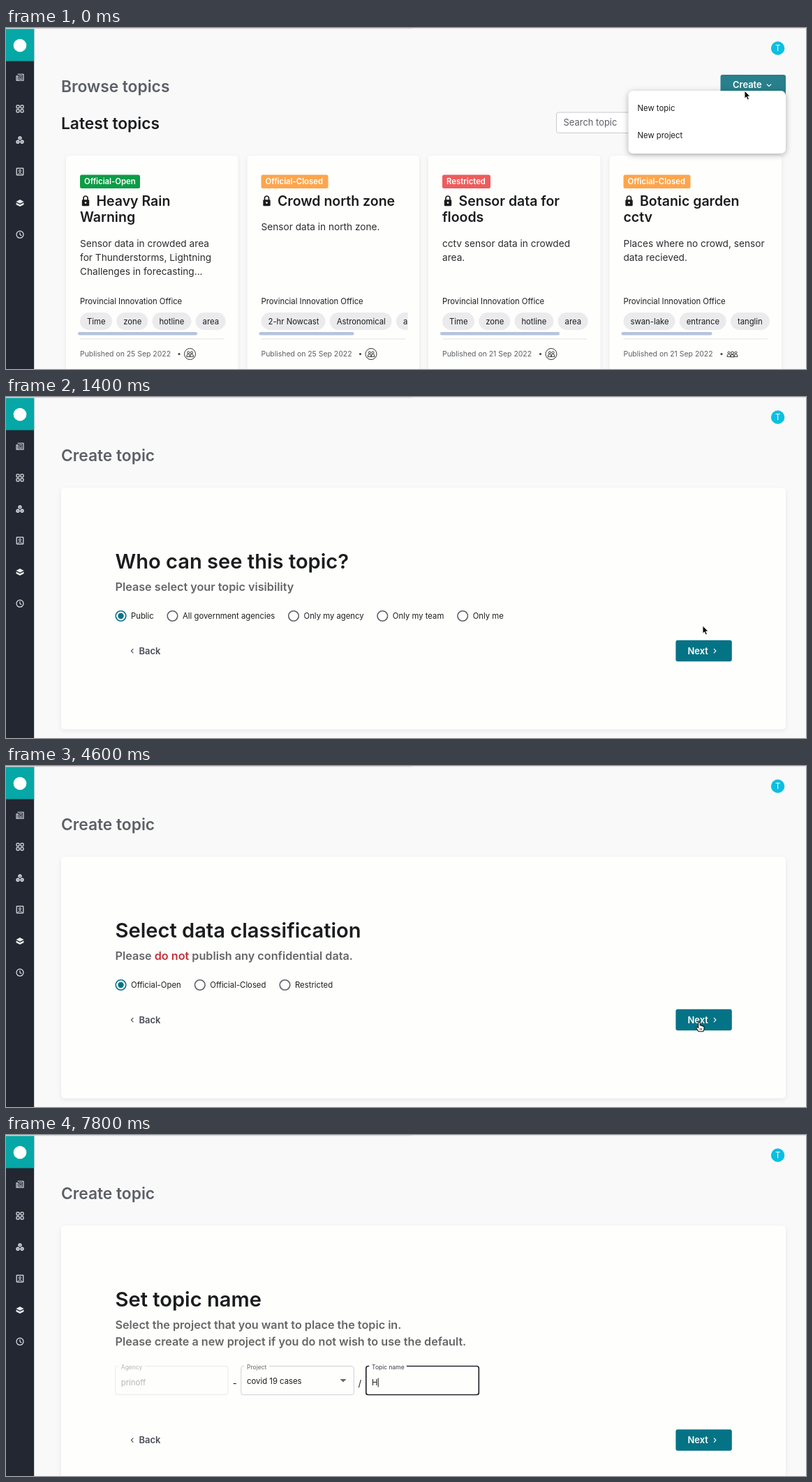
Write an HTML page that moves like this. It is 1146 by 489 pixels and loops after 8000 ms.

```html
<!DOCTYPE html>
<html lang="en">
<head>
<meta charset="utf-8">
<title>Create topic</title>
<style>
  html, body { margin: 0; width: 100%; height: 100%; overflow: hidden; background: #f9f9fa; }
  svg { display: block; font-family: Inter, sans-serif; font-optical-sizing: none; }
  text { white-space: pre; }
  .card { fill: #fefefd; filter: drop-shadow(0 2px 3px rgba(0,0,0,.07)); }
  .menu { fill: #fff; filter: drop-shadow(0 2px 4px rgba(0,0,0,.3)); }
  .line { fill: none; stroke-linecap: round; stroke-linejoin: round; }
</style>
</head>
<body>
<svg id="stage" width="1146" height="489" viewBox="0 0 1146 489"></svg>
<script>
const STEP = 200, LOOP = 8000;
const TEAL = '#057386', INK = '#1b1c1e', GREY = '#5c5f66';
const SMALL = 11.32, MEDIUM = 12.95, SUBHEAD = 16.2, TITLE = 22.75, HERO = 29.1;

const text = (x, y, s, size = SMALL, fill = INK, weight = 400, extra = '') =>
  `<text x="${x}" y="${y}" font-size="${size}" fill="${fill}" font-weight="${weight}" ${extra}>${s}</text>`;
const rect = (x, y, w, h, fill, r = 0, extra = '') =>
  `<rect x="${x}" y="${y}" width="${w}" height="${h}" rx="${r}" fill="${fill}" ${extra}/>`;
const circle = (x, y, r, fill, extra = '') =>
  `<circle cx="${x}" cy="${y}" r="${r}" fill="${fill}" ${extra}/>`;
const line = (d, stroke, width = 1.2) =>
  `<path class="line" d="${d}" stroke="${stroke}" stroke-width="${width}"/>`;
const at = (x, y, body) => `<g transform="translate(${x} ${y})">${body}</g>`;
const heading = (y, s, size, fill = INK) => text(156.5, y, s, size, fill, 600);

// Sidebar and header

const sidebarIcons = [
  line('M-3-4.5H5V4.5H-5V-2H-3V4M-1-2H3M-1 .5H0M2 .5H3M-1 2.5H3', '#e8eaed', 1.1),
  [[-5, -5], [1, -5], [-5, 1], [1, 1]].map(([x, y]) =>
    rect(x, y, 4, 4, 'none', 1, 'stroke="#e8eaed" stroke-width="1.2"')).join(''),
  [[0, -3], [-3, 2.4], [3, 2.4]].map(([x, y]) =>
    circle(x, y, 2.1, '#8d929b', 'stroke="#e8eaed" stroke-width="1.2"')).join(''),
  rect(-4.8, -4.8, 9.6, 9.6, 'none', .5, 'stroke="#e8eaed" stroke-width="1.2"') +
    circle(0, -1.2, 1.5, 'none', 'stroke="#e8eaed"') + line('M-3 3.5Q0 0 3 3.5', '#e8eaed', 1),
  '<path d="M0-5 5.5-2.2 0 .6-5.5-2.2ZM-5.5-.6 0 2.2 5.5-.6V2.2L0 5-5.5 2.2Z" fill="#e8eaed"/>',
  circle(0, 0, 5, 'none', 'stroke="#e8eaed" stroke-width="1.2"') + line('M0-2.8V0L2 1.5', '#e8eaed', 1.1)
];

const frame = title =>
  rect(0, 0, 1146, 489, '#f9f9fa') +
  rect(0, 0, 40.2, 489, '#222731') +
  rect(0, 1, 40.2, 46.5, '#05a8a6') +
  circle(20, 25, 9.3, '#fff') +
  sidebarIcons.map((icon, i) => at(20, 70.7 + i * 45.1, icon)).join('') +
  rect(0, 0, 1146, 1.2, '#e9e2e4') + rect(0, 0, 582, 1.2, '#dbd3d6') +
  circle(1105.6, 29, 9.7, '#0cbfe0') +
  text(1105.6, 33, 'T', SMALL, '#fff', 400, 'text-anchor="middle"') +
  text(79, 92, title, TITLE, GREY, 600);

// Topic list

const badges = { Open: ['#0c9c46', 86], Closed: ['#fea54c', 96], Restricted: ['#ee5c5c', 69] };
const basicTags = [['Time', 46], ['zone', 45], ['hotline', 56], ['area', 43]];
const topics = [
  { level: 'Open', title: ['Heavy Rain', 'Warning'], day: 25, tags: basicTags, thumb: 171,
    about: ['Sensor data in crowded area', 'for Thunderstorms, Lightning', 'Challenges in forecasting...'] },
  { level: 'Closed', title: ['Crowd north zone'], day: 25, thumb: 136,
    tags: [['2-hr Nowcast', 92], ['Astronomical', 89], ['area', 43]], about: ['Sensor data in north zone.'] },
  { level: 'Restricted', title: ['Sensor data for', 'floods'], day: 21, tags: basicTags, thumb: 171,
    about: ['cctv sensor data in crowded', 'area.'] },
  { level: 'Closed', title: ['Botanic garden', 'cctv'], day: 21, thumb: 130,
    tags: [['swan-lake', 74], ['entrance', 67], ['tanglin', 56]],
    about: ['Places where no crowd, sensor', 'data recieved.'] }
];

const lock =
  line('M-3-1V-4A3 3 0 0 1 3-4V-1', INK, 1.7) + rect(-5.2, -1.8, 10.4, 9, INK, 1.3) + circle(0, 2.6, 1.3, '#fff');
const person = (x, y, r) =>
  circle(x, y - 2, r, 'none', 'stroke="#333"') + line(`M${x - 2.6} ${y + 3.4}q0-3.4 2.6-3.4t2.6 3.4z`, '#333', 1);
const twoPeople = circle(0, 0, 8, 'none', 'stroke="#333"') + person(-2.2, 0, 1.6) + person(2.5, 0, 1.6);
const threePeople = person(-5, 0, 1.5) + person(5, 0, 1.5) + person(0, .5, 2);

function topicCard({ level, title, day, tags, thumb, about }, i) {
  const [color, badgeWidth] = badges[level];
  const aboutY = 290 + (title.length - 1) * 23.5;
  let tagX = 20;
  const pills = tags.map(([name, w]) => {
    const pill = rect(tagX, 408, w, 25, '#ebebed', 12.5) + text(tagX + 10, 424.5, name);
    tagX += w + 6.2;
    return pill;
  }).join('');
  return at(86 + i * 259.5, 0,
    rect(0, 183, 246.5, 330, '', 5, 'class="card"') +
    rect(20, 210.5, badgeWidth, 19.5, color, 2.5) +
    text(26, 224.3, level === 'Restricted' ? level : 'Official-' + level, SMALL, '#fff', 600) +
    at(28, 248, lock) +
    title.map((s, n) => text(n ? 20 : 43.5, 254.7 + n * 23.5, s, 19.5, INK, 600)).join('') +
    about.map((s, n) => text(20, aboutY + n * 20.1, s, 13.66, '#2b2c2f')).join('') +
    text(20, 396, 'Provincial Innovation Office') +
    `<svg x="0" y="400" width="230" height="36" viewBox="0 400 230 36">${pills}</svg>` +
    rect(17, 436, thumb, 4.6, '#b5c3dd', 2.3) +
    rect(20, 445.5, 207, 1, '#e6e6e8') +
    text(20, 471, `Published on ${day} Sep 2022`, 10.45, GREY) +
    circle(i < 2 ? 162 : 160.5, 467.5, 1.6, '#444') +
    at(i < 2 ? 177.5 : 176, 467.5, i === 3 ? threePeople : twoPeople));
}

const browsePage = step =>
  frame('Browse topics') +
  text(79, 145, 'Latest topics', TITLE, INK, 600) +
  rect(788.5, 121, 328, 29.5, '#fff', 3, 'stroke="#c9cacd"') +
  text(798.5, 140.3, 'Search topic', MEDIUM, GREY) +
  topics.map(topicCard).join('') +
  rect(1023.5, 67, 93.5, 30, '#27808b', 3) +
  text(1041, 86.4, 'Create', MEDIUM, '#fff', 600) +
  line('M1090.3 81l2.7 2.6 2.7-2.6', '#fff') +
  rect(891.5, 90, 225.5, 90, '', 7, 'class="menu"') +
  (step === 1 ? rect(891.5, 96, 225.5, 38, '#f3f3f4') : '') +
  text(904.5, 119.3, 'New topic') + text(904.5, 158, 'New project');

// Wizard

const wizardCard = bottom => frame('Create topic') + rect(79, 130, 1038, bottom - 130, '', 5, 'class="card"');

const nextButton = (y, enabled = true) =>
  rect(959.4, y - 15.3, 80.4, 30.6, enabled ? TEAL : '#b7b9bd', 3) +
  text(976.5, y + 4.6, 'Next', MEDIUM, '#fff', 600) +
  line(`M1014.3 ${y - 2.6}l2.6 2.7-2.6 2.7`, '#fff');

const backButton = y =>
  line(`M182 ${y - 2.6}l-2.6 2.7 2.6 2.7`, '#484c56') + text(190.5, y + 4.6, 'Back', MEDIUM, '#484c56', 600);

const radios = (y, options, selected, pressed) => options.map(([x, label], i) =>
  (i === selected && pressed ? circle(x, y, 16, '#dbe9ed') : '') +
  circle(x, y, 7.3, i === selected && pressed ? '#fefefd' : 'none',
    `stroke="${i === selected ? TEAL : '#606165'}" stroke-width="1.6"`) +
  (i === selected ? circle(x, y, pressed ? 3 : 4.2, TEAL) : '') +
  text(x + 14.5, y + 4.2, label)).join('');

function typePage(step) {
  const loading = rect(0, 0, 1146, 489, '#363636', 0, 'opacity=".235"') +
    `<path d="M565.7 277.8A24.5 24.5 0 1 1 558.2 313.4" fill="none" stroke="#fff" stroke-width="3"
      transform="rotate(${(step - 3) * 100} 578 299)"/>`;
  return wizardCard(442.5) +
    heading(245.8, 'Select type of topic', HERO) +
    radios(280, [[164.5, 'Create new topic'], [297.5, 'Add child topic to an existing topic']], 0) +
    nextButton(330.5) + (step < 4 ? loading : '');
}

const visibilityPage = step =>
  wizardCard(476.5) +
  heading(245.8, 'Who can see this topic?', HERO) +
  heading(278, 'Please select your topic visibility', SUBHEAD, '#666668') +
  radios(314, [[164.5, 'Public'], [238.5, 'All government agencies'], [412, 'Only my agency'],
    [539.3, 'Only my team'], [654.2, 'Only me']], step < 11 ? 0 : 1, step === 11) +
  backButton(364) + nextButton(364);

const classificationPage = () =>
  wizardCard(476.5) +
  heading(245.8, 'Select data classification', HERO) +
  heading(278, 'Please <tspan fill="#c4303c">do not</tspan> publish any confidential data.', SUBHEAD, '#666668') +
  radios(314, [[164.5, 'Official-Open'], [277.8, 'Official-Closed'], [399.5, 'Restricted']], 0) +
  backButton(364) + nextButton(364);

// lift: 0 = label inside the field, 1 = label raised onto the border
function field(x, label, notch, { lift = 0, focus, disabled, value = '', valueY = 359 }) {
  const tone = disabled ? '#b4b5b7' : '#66686c';
  const border = focus ? '#24262b' : disabled ? '#e9e9ea' : '#cfd0d2';
  return rect(x, 331.5, 161.5, 41, 'none', 3, `stroke="${border}" stroke-width="${focus ? 1.7 : 1}"`) +
    (lift ? rect(x + 4.5, 329.5, notch, 4, '#fefefd') : '') +
    text(x + 8.3, 356.3 - 20.5 * lift, label, SMALL * (1 - .25 * lift), focus && lift === 1 ? '#3a3c40' : tone) +
    text(x + 8.3, valueY, value, SMALL, disabled ? '#b4b5b7' : INK);
}

function projectMenu(opacity, scaleY) {
  return `<g opacity="${opacity}" transform="translate(0 402.5) scale(1 ${scaleY}) translate(0 -402.5)">` +
    rect(332, 333, 147, 139, '', 3, 'class="menu"') +
    text(345, 354.3, 'covid 19 cases') +
    line('M347.5 455.5h6M350.5 452.5v6', TEAL, 1.1) +
    text(364, 459.5, 'Create new project', SMALL, TEAL) + '</g>';
}

function namePage(step) {
  const chosen = step >= 31, typing = step >= 35, typed = step >= 39;
  const projectLift = step < 28 ? 0 : step === 28 ? .2 : 1;
  const menus = { 28: [.55, .9], 29: [1, 1], 30: [1, 1], 31: [.4, 1] };
  return wizardCard(560) +
    heading(245.8, 'Set topic name', HERO) +
    heading(278, 'Select the project that you want to place the topic in.', SUBHEAD, '#666668') +
    heading(302.2, 'Please create a new project if you do not wish to use the default.', SUBHEAD, '#666668') +
    field(156.5, 'Agency', 38, { lift: +chosen, disabled: true, value: chosen ? 'prinoff' : '' }) +
    text(324.7, 360.5, '-', MEDIUM) +
    field(336.8, 'Project', 36, { lift: projectLift, focus: step >= 27 && !typing,
      value: chosen ? 'covid 19 cases' : '', valueY: 357 }) +
    `<path d="M478.5 350h9l-4.5 4.6z" fill="${typing ? '#66686c' : INK}"/>` +
    text(504.5, 361, '/', MEDIUM) +
    field(515.8, 'Topic name', 53.5, { lift: +typing, focus: typing, value: typed ? 'H' : '' }) +
    (typing ? rect(typed ? 532.7 : 524.3, 348.5, 1, 13, INK) : '') +
    backButton(437.5) + nextButton(437.5, typed) +
    (menus[step] ? projectMenu(...menus[step]) : '');
}

// Pointer: step, x, y of its tip
const path = [
  [0, 1058, 90], [1, 1056, 112], [3, 1055.5, 245], [4, 1042, 271], [5, 1005, 318], [6, 998, 328], [7, 998, 328],
  [11, 288, 311], [12, 288, 311], [15, 993, 362], [17, 993, 362], [22, 993, 367], [24, 993, 367],
  [27, 448, 347], [28, 445, 347], [30, 420, 348], [32, 420, 350], [35, 590, 348], [40, 590, 348]
];
const handSpans = [[1, 1], [5, 6], [10, 12], [15, 16], [19, 23], [27, 31]];

function pointer(step) {
  if (step >= 38) return '';
  const i = path.findIndex(key => key[0] > step) - 1;
  const [s0, x0, y0] = path[i], [s1, x1, y1] = path[i + 1];
  const p = (step - s0) / (s1 - s0), ease = p * p * (3 - 2 * p);
  const hand = handSpans.some(([from, to]) => step >= from && step <= to);
  const shape = hand
    ? '<path d="M-1.3 1Q0-.8 1.3 1V5Q2.4 4.2 3.4 5.5 4.6 4.9 5.3 6.2 7 5.8 7 7.8V10.5L5.7 13.8H-1L-4.3 8.8Q-4 7-2.8 7.2L-1.3 8.6Z" fill="#fff" stroke="#111" stroke-width="1.1" stroke-linejoin="round"/><path d="M1.4 9v2.6M3.5 9v2.6" stroke="#111" stroke-width=".9"/>'
    : step >= 34
      ? line('M-2-6Q0-6 0-4Q0-6 2-6M0-4V5M-2 7Q0 7 0 5Q0 7 2 7', '#222', 1)
      : '<path d="M0 0V11.2L2.5 8.9 4.3 13 6.4 12.1 4.6 8.1H8Z" fill="#0a0a0a" stroke="#fff" stroke-width=".9"/>';
  return at(x0 + (x1 - x0) * ease, y0 + (y1 - y0) * ease, shape);
}

const pages = [[24, namePage], [17, classificationPage], [7, visibilityPage], [2, typePage], [0, browsePage]];
const stage = document.getElementById('stage');
let shown = -1;

function render(now) {
  const step = Math.floor((now % LOOP) / STEP);
  if (step !== shown) {
    const page = pages.find(([from]) => step >= from)[1];
    stage.innerHTML = page(step) + pointer(step);
    shown = step;
  }
}

const start = performance.now();
function tick() {
  render(performance.now() - start);
  requestAnimationFrame(tick);
}
tick();
</script>
</body>
</html>
```
